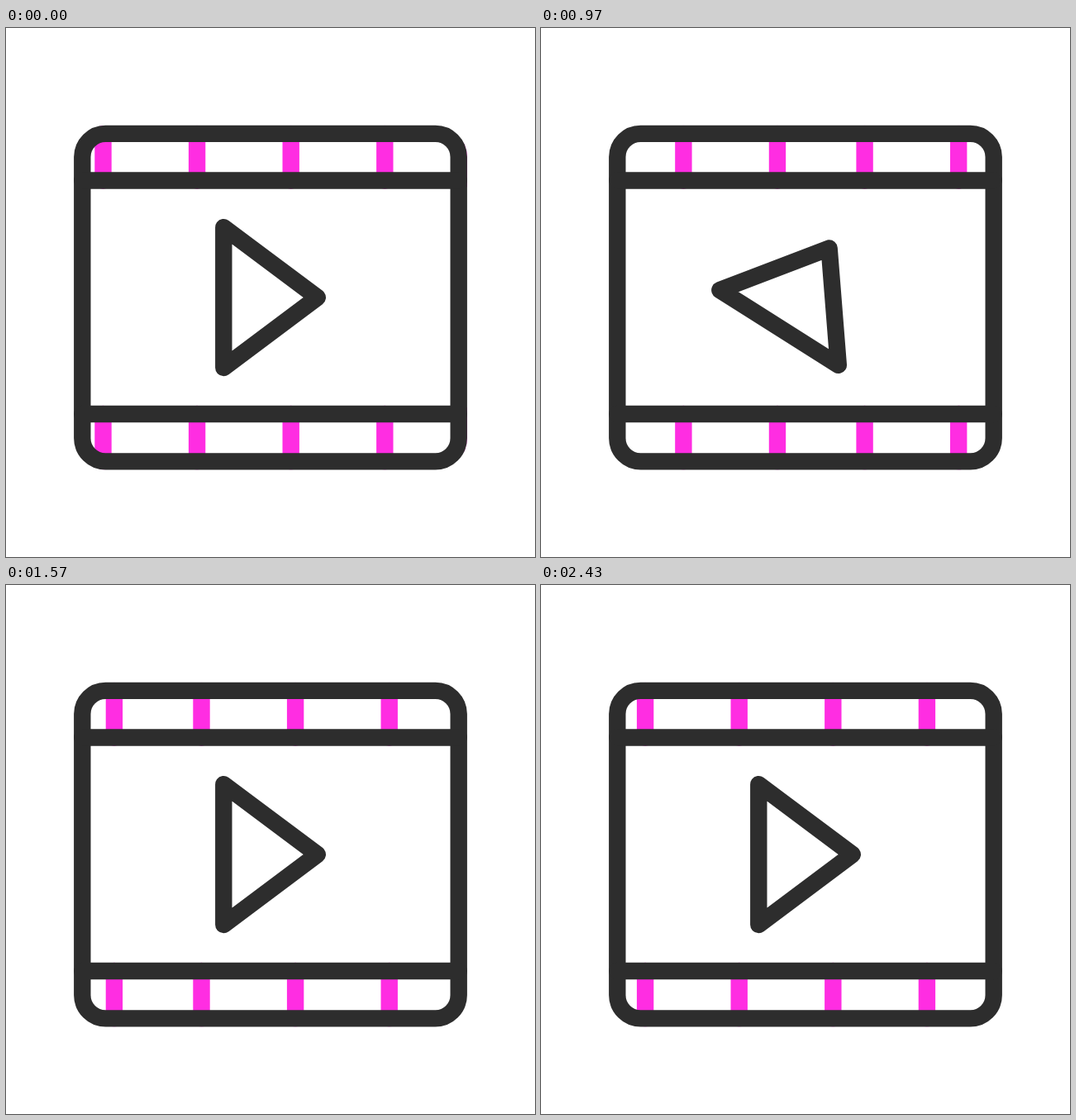
Write an HTML page that moves like this. It is 640 px wide and 640 px high and loops after 2500 ms.

```html
<!DOCTYPE html>
<html lang="en">
<head>
<meta charset="utf-8">
<title>Film strip</title>
<style>
  html, body { margin: 0; width: 100%; height: 100%; overflow: hidden; background: #fff; }
  svg { display: block; width: 100%; height: 100%; }
  .line { fill: none; stroke: #2d2d2d; stroke-width: 20.4; stroke-linecap: round; stroke-linejoin: round; }
  #bars { fill: none; stroke: #ff2de2; stroke-width: 20.4; stroke-linecap: round; }
</style>
</head>
<body>
<svg viewBox="0 0 640 640">
  <clipPath id="film"><rect x="82.1" y="117.7" width="475.8" height="416.9" rx="38.4"/></clipPath>
  <g clip-path="url(#film)"><path id="bars"/></g>
  <rect class="line" x="92.3" y="127.9" width="455.4" height="396.5" rx="28.2"/>
  <path class="line" d="M92.3 184.5H547.7M92.3 467H547.7"/>
  <path class="line" id="play" d="M263.3 241.2V411L376.8 326Z"/>
</svg>
<script>
const LOOP = 2500, START = 9, LAST = 73;
const SPEED = 560 / 65;            // strip travel per step
const SPIN = 33;                   // steps in the turn
const PITCH = 113.6;
const bars = document.getElementById('bars');
const play = document.getElementById('play');

const row = (x, count) => Array.from({ length: count }, (_, i) => x + i * PITCH);
const strip = [...row(117.5, 4), ...row(563.9, 6)];

const bezier = (a, b, s) => 3 * s * (1 - s) ** 2 * a + 3 * s * s * (1 - s) * b + s ** 3;

function ease(x) {
  if (x <= 0) return 0;
  if (x >= 1) return 1;
  let low = 0, high = 1;
  for (let i = 0; i < 30; i++) {
    const mid = (low + high) / 2;
    if (bezier(0.467, 0.29, mid) < x) low = mid; else high = mid;
  }
  return bezier(0, 1, low);
}

function draw(time) {
  // 30 steps a second, with starts rounded to 10 ms
  const step = Math.floor(Math.floor(time / 10) * 0.3 + 0.15);
  const moved = Math.max(0, Math.min(step, LAST) - START);
  bars.setAttribute('d', strip.map(x => {
    const at = (x - moved * SPEED).toFixed(2);
    return `M${at} 127.9V184.5M${at} 467V524.4`;
  }).join(''));
  play.setAttribute('transform', `rotate(${360 * ease(moved / SPIN)} 308.7 321.8)`);
}

const began = performance.now();
function tick() {
  draw((performance.now() - began) % LOOP);
  requestAnimationFrame(tick);
}
tick();
</script>
</body>
</html>
```
